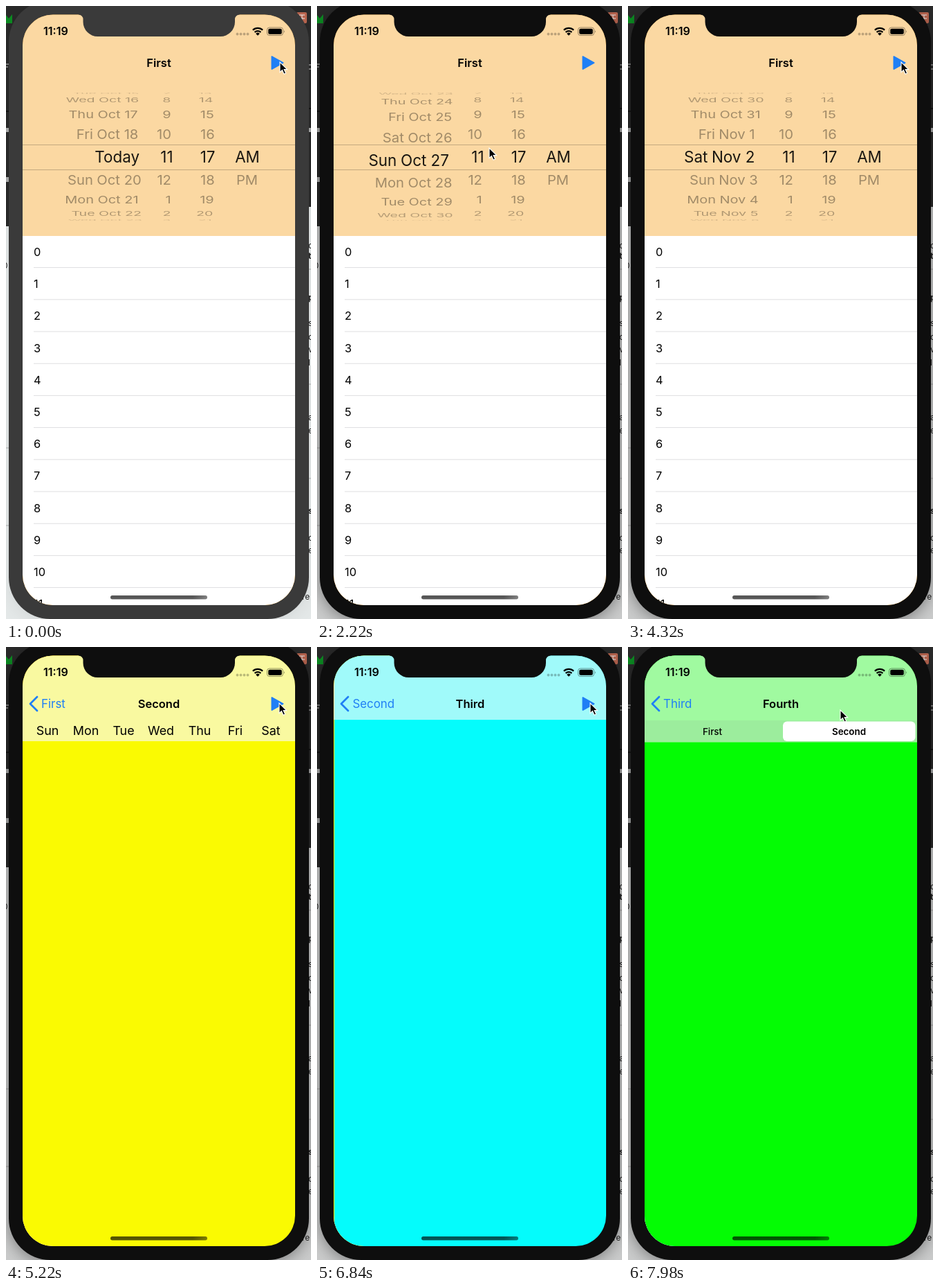
Animation, 441 px wide and 885 px high, one loop 8 s. Source, as an HTML page:

```html
<!DOCTYPE html>
<html lang="en">
<head>
<meta charset="utf-8">
<title>Navigation bar demo</title>
<style>
html, body { margin: 0; width: 100%; height: 100%; overflow: hidden; background: #222; }
svg { display: block; width: 100%; height: 100%; font-family: Inter, Roboto, sans-serif; }
.title { font-size: 16.5px; font-weight: 600; text-anchor: middle; }
.back { font-size: 16.9px; fill: #1f7ff5; }
</style>
</head>
<body>
<svg viewBox="0 0 441 885">
  <defs>
    <clipPath id="screenClip"><rect x="24" y="12.5" width="394" height="852.5" rx="44"/></clipPath>
    <clipPath id="lensClip"><rect x="24" y="201" width="394" height="35.5"/></clipPath>
    <clipPath id="wheelClip"><path d="M24 125H418V200H24ZM24 237H418V311H24Z"/></clipPath>
    <clipPath id="barClip"><rect id="barClipRect" x="24" y="12" width="394" height="320"/></clipPath>
    <filter id="soft" x="-20%" y="-10%" width="140%" height="120%"><feGaussianBlur stdDeviation="11"/></filter>
    <linearGradient id="homeFill">
      <stop offset=".85" stop-opacity=".66"/>
      <stop offset="1" stop-opacity=".5"/>
    </linearGradient>
  </defs>

  <g id="backdrop">
    <rect id="desk" width="441" height="885"/>
    <path d="M0 0H441V290H436V318H0Z" fill="#292929"/>
    <path d="M0 176H5V182H0ZM0 247H5V254H0ZM437 176H441V182H437Z" fill="#a9aaaa"/>
    <path d="M0 13L4 18L9 12V25H0Z" fill="#0c8a22"/>
    <rect x="420" y="9" width="15" height="16" rx="2" fill="#b9654f"/>
    <path d="M424 13H432M428 13V22M424 18H432" stroke="#eee" fill="none"/>
    <path d="M0 84H4M0 88H3M438 85H441M438 91H441" stroke="#ccc"/>
    <path d="M0 152H5M438 148H441" stroke="#000"/>
    <g font-size="12" fill="#222">
      <text x="-5" y="379">0</text><text x="437" y="350">c</text><text x="437" y="365" font-weight="700">t</text>
      <text x="437" y="425" font-weight="700">p</text><text x="437" y="462">s</text><text x="437" y="482">o</text>
      <text x="437" y="500">v</text><text x="437" y="519">l</text><text x="437" y="598">al</text><text x="437" y="617">e</text>
      <text x="437" y="733" font-weight="700">s</text><text x="437" y="772">c</text><text x="437" y="790">e</text>
      <text x="428" y="857">re</text>
    </g>
    <path d="M0 638H4M0 750H4M438 380H441M438 546H441M438 682H441" stroke="#777" stroke-opacity=".5"/>
  </g>
  <rect id="shadow" x="4" y="0" width="434" height="889" rx="60" filter="url(#soft)"/>
  <rect id="bezel" x="4" y="-8" width="434" height="893" rx="60"/>

  <g clip-path="url(#screenClip)">
    <g id="screens"></g>
    <rect id="bar" x="24" y="12" width="394" fill="#f9f9f9" fill-opacity=".64"/>
    <g clip-path="url(#barClip)">
      <g id="palette0">
        <g id="wheels"></g>
        <path d="M24 200.5H418M24 236.5H418" stroke="#000" stroke-opacity=".22"/>
      </g>
      <g id="palette1" font-size="17.9" text-anchor="middle"></g>
      <g id="palette2"></g>
      <g id="palette3" text-anchor="middle" font-size="13.4">
        <rect x="24" y="106" width="394" height="31.5" fill="#767680" fill-opacity=".1"/>
        <rect x="224" y="107.5" width="191.5" height="28.5" rx="6" fill="#fff"/>
        <text x="122" y="126.5" font-weight="500">First</text>
        <text x="319.5" y="126.5" font-weight="600">Second</text>
      </g>
    </g>
    <g id="titles"></g>
    <path id="chevron" d="M45 72L35 82L45 92" fill="none" stroke="#1f7ff5" stroke-width="2.8" stroke-linecap="round" stroke-linejoin="round"/>
    <path id="play" d="M384.5 73V91L400.5 82Z" fill="#1f7ff5" stroke="#1f7ff5" stroke-width="2" stroke-linejoin="round"/>
    <rect x="151" y="851" width="140" height="5.5" rx="2.7" fill="url(#homeFill)"/>

    <text x="54" y="42" font-size="16.1" font-weight="600">11:19</text>
    <g fill-opacity=".25">
      <circle cx="334.5" cy="40.5" r="1.9"/><circle cx="339.5" cy="40.5" r="1.9"/>
      <circle cx="344.5" cy="40.5" r="1.9"/><circle cx="349.5" cy="40.5" r="1.9"/>
    </g>
    <path d="M356.9 34.8A10 10 0 0 1 371.1 34.8M359.6 37.9A6.2 6.2 0 0 1 368.4 37.9" fill="none" stroke="#000" stroke-width="2.3"/>
    <path d="M364 42.8L361.2 39.9A4 4 0 0 1 366.8 39.9Z"/>
    <rect x="377.5" y="31" width="23" height="11.5" rx="3.4" fill="none" stroke="#000" stroke-opacity=".4"/>
    <rect x="379.2" y="32.7" width="19.6" height="8.1" rx="2"/>
    <path d="M402 34.8Q403.8 36.8 402 38.8Z" fill-opacity=".45"/>
  </g>
  <path id="notch" d="M105 11V12.5A6.5 6.5 0 0 1 111.5 19V23A21 21 0 0 0 132.5 44H310A21 21 0 0 0 331 23V19A6.5 6.5 0 0 1 337.5 12.5V11Z"/>
  <path id="cursor" d="M0 0V14.6L3.4 11.5L6 17.2L8.6 16L6.1 10.6H10.6Z" stroke="#fff" stroke-width="1.1"/>
</svg>
<script>
const LOOP = 8000, WIDTH = 394, MID = 221, PARALLAX = 118;
const $ = id => document.getElementById(id);
const pages = [
  { title: 'First', color: '#ff9e08', bottom: 332 },
  { title: 'Second', color: '#fafa02', bottom: 136, start: 4560 },
  { title: 'Third', color: '#04fcfc', bottom: 105, start: 6225 },
  { title: 'Fourth', color: '#04fc04', bottom: 137.5, start: 7200 }
];
const pointer = [
  [0, 396, 81], [1380, 396, 81], [1700, 165, 245], [1780, 165, 245], [1920, 185, 197],
  [2220, 249, 205], [3060, 400, 124], [3300, 400, 124], [3840, 395, 81],
  [7620, 395, 81], [7980, 307, 91]
];
const days = ['Sun', 'Mon', 'Tue', 'Wed', 'Thu', 'Fri', 'Sat'];

function tableRows() {
  let out = `<rect x="24" y="332" width="${WIDTH}" height="540" fill="#fff"/>`;
  for (let n = 0; n < 12; n++) {
    const y = 355 + 46.2 * n;
    out += `<text x="40" y="${y + 6}" font-size="16.4">${n}</text>` +
      `<path d="M40 ${y + 22.6}H418" stroke="#dedee0"/>`;
  }
  return out;
}

$('screens').innerHTML = pages.map((page, i) =>
  `<g id="screen${i}"><rect x="24" y="12" width="${WIDTH}" height="853" fill="${page.color}"/>` +
  (i ? '' : tableRows()) +
  `<rect id="dim${i}" x="24" y="12" width="${WIDTH}" height="853"/></g>`).join('');

$('titles').innerHTML = pages.map((page, i) =>
  `<text id="title${i}" class="title" y="88">${page.title}</text>` +
  `<text id="back${i}" class="back" y="88">${page.title}</text>`).join('');

const dayCenters = [60, 115.5, 170, 224, 280, 331.5, 383];
$('palette1').innerHTML = days.map((day, i) => `<text x="${dayCenters[i]}" y="127">${day}</text>`).join('');

// Picker wheels: cells return [anchor, x in wheel, x in lens, label].
function dateCells(n) {
  if (n === 0) return [['end', 195.5, 193, 'Today']];
  const date = new Date(2019, 9, 19 + n);
  const month = date.getMonth() === 9 ? 'Oct' : 'Nov';
  return [
    ['end', 125.5, 115.3, days[date.getDay()]],
    ['start', 131, 121, `${month} ${date.getDate()}`]
  ];
}
const hourCells = n => [['end', 239, 241.5, (n + 22) % 12 + 1]];
const minuteCells = n => [['end', 302, 302.5, 17 + n]];
const halfCells = n => n === 0 || n === 1 ? [['middle', 349, 349, n ? 'PM' : 'AM']] : [];

function wheel(position, cells) {
  let outer = '', lens = '';
  const base = Math.round(position);
  for (let n = base - 5; n <= base + 5; n++) {
    const angle = (n - position) * 0.367, flat = Math.cos(angle);
    if (flat < 0.02) continue;
    const y = 218 + 92 * Math.sin(angle);
    const inLens = Math.abs(y - 218) < 36;
    for (const [anchor, x, lensX, label] of cells(n)) {
      const row = (left, size, squeeze, alpha) =>
        `<text transform="translate(${MID} ${y}) scale(${squeeze} ${flat})" x="${left - MID}" y="${size * 0.364}" ` +
        `font-size="${size}" text-anchor="${anchor}" fill-opacity="${alpha}">${label}</text>`;
      outer += row(x, 20.3, 0.94 + 0.06 * flat, 0.36 * Math.min(1, 0.25 + flat * 1.3));
      if (inLens) lens += row(lensX, 22.4, 1, 0.9);
    }
  }
  return `<g clip-path="url(#wheelClip)">${outer}</g><g clip-path="url(#lensClip)">${lens}</g>`;
}
$('wheels').innerHTML = '<g id="dates"></g>' + wheel(0, hourCells) + wheel(0, minuteCells) + wheel(0, halfCells);

// A short drag, then the wheel coasts down to a stop two weeks later.
function datePosition(t) {
  if (t < 1780) return 0;
  if (t < 1920) return 1.45 * ((t - 1780) / 140) ** 2;
  return 14 - Math.max(0, 6.21 * Math.exp((2220 - t) / 424) - 0.05);
}

function spring(ms) {
  if (ms <= 0) return 0;
  if (ms >= 650) return 1;
  const x = 0.013 * ms;
  return 1 - (1 + x) * Math.exp(-x);
}

function pointerAt(t) {
  const next = pointer.findIndex(key => key[0] > t);
  if (next < 0) return pointer[pointer.length - 1].slice(1);
  const [t0, x0, y0] = pointer[next - 1], [t1, x1, y1] = pointer[next];
  const u = (t - t0) / (t1 - t0), e = u * u * (3 - 2 * u);
  return [x0 + (x1 - x0) * e, y0 + (y1 - y0) * e];
}

const set = (id, name, value) => $(id).setAttribute(name, value);
const slide = (id, x) => set(id, 'transform', `translate(${x} 0)`);
const fadeOut = progress => Math.max(0, 1 - 1.6 * progress);
let shownDate = null;

function draw(t) {
  const active = t >= 1740;
  const frame = active ? '#0e0e0e' : '#3a3a3a';
  set('desk', 'fill', active ? '#cacbcb' : '#e4e8e8');
  set('shadow', 'fill-opacity', active ? 0.38 : 0.08);
  set('bezel', 'fill', frame);
  set('notch', 'fill', frame);

  const position = datePosition(t);
  if (position !== shownDate) {
    $('dates').innerHTML = wheel(position, dateCells);
    shownDate = position;
  }

  const shown = pages.map((page, i) => i ? spring(t - page.start) : 1);
  let bottom = pages[0].bottom;
  pages.forEach((page, i) => {
    const enter = shown[i], leave = shown[i + 1] || 0, gone = shown[i + 2] || 0;
    if (i) bottom += enter * (page.bottom - pages[i - 1].bottom);
    slide('screen' + i, WIDTH * (1 - enter) - PARALLAX * leave);
    set('dim' + i, 'fill-opacity', 0.1 * leave);
    slide('palette' + i, WIDTH * (1 - enter - leave));
    set('palette' + i, 'opacity', enter > 0 && leave < 1 ? 1 : 0);
    set('title' + i, 'x', MID + 150 * (1 - enter) - 150 * leave);
    set('title' + i, 'opacity', enter * fadeOut(leave));
    set('back' + i, 'x', 51 + 140 * (1 - leave) - 70 * gone);
    set('back' + i, 'opacity', leave * leave * fadeOut(gone));
  });
  set('bar', 'height', bottom - 12);
  set('barClipRect', 'height', bottom - 12);
  set('chevron', 'opacity', shown[1]);
  set('play', 'opacity', fadeOut(shown[3]));
  set('cursor', 'transform', `translate(${pointerAt(t)})`);
}

const began = performance.now();
function tick() {
  draw((performance.now() - began) % LOOP);
  requestAnimationFrame(tick);
}
tick();
</script>
</body>
</html>
```
